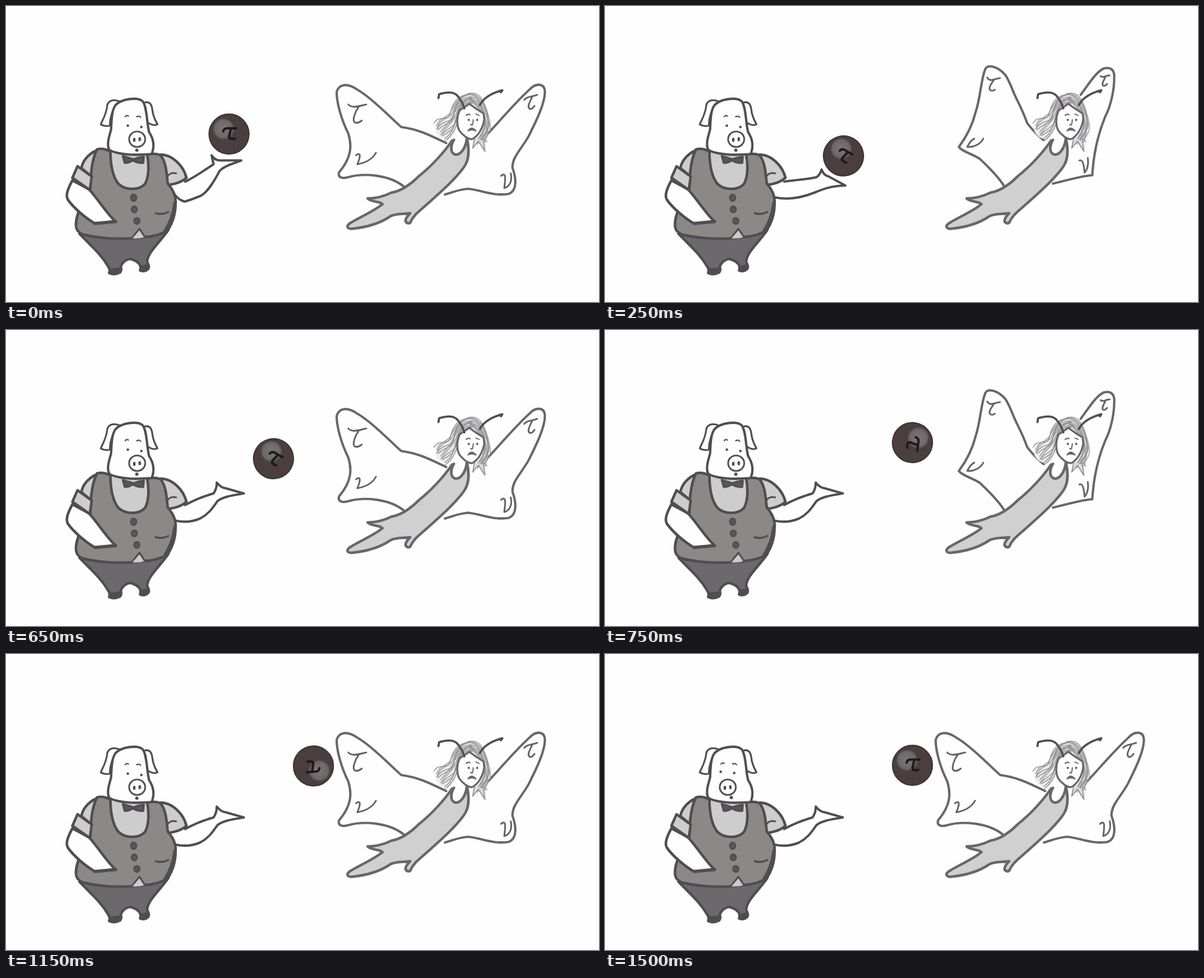
Animation, 920 px wide and 460 px high, one loop 1.75 s. Source, as an HTML page:

```html
<!DOCTYPE html>
<html lang="en">
<head>
<meta charset="utf-8">
<title>Pig and winged woman</title>
<style>
  html, body { margin: 0; width: 100%; height: 100%; overflow: hidden; background: #fefefe; }
  svg { display: block; width: 920px; height: 460px; }
  path, ellipse, circle { stroke-linecap: round; stroke-linejoin: round; }
  .pig { fill: none; stroke: #4f4d50; stroke-width: 4; }
  .fairy { fill: none; stroke: #68666a; stroke-width: 4; }
  .wing { stroke-width: 3.6; }
  .wing .mark { stroke: #626064; stroke-width: 2.6; }
  .white { fill: #fefefe; }
  .shirt { fill: #cdcdcd; }
  .vest { fill: #8b8988; }
  .pants { fill: #6b696b; }
  .dark { fill: #59575a; }
  .thin { stroke-width: 2.8; }
  .dot { fill: #4f4d50; stroke: none; }
</style>
</head>
<body>
<svg viewBox="0 0 920 460">
  <defs>
    <radialGradient id="shine">
      <stop offset="0" stop-color="#7b7778"/>
      <stop offset=".8" stop-color="#6c6768"/>
      <stop offset="1" stop-color="#4b3e3f"/>
    </radialGradient>
  </defs>

  <g class="pig">
    <path id="arm" class="white" stroke-width="3.6"/>
    <path class="shirt" d="M240 231C257 231 275 247 280 267C272 274 262 277 251 278Z"/>
    <path class="thin" d="M251 264C255 259 259 259 264 260"/>
    <path class="shirt" d="M148 222C131 226 119 239 117 252L134 266L146 250Z"/>
    <path class="shirt" stroke="none" d="M158 224L228 230L224 282L172 284Z"/>
    <path class="pants" d="M114 354C130 371 147 385 158 404Q162 409 160 415Q168 419 177 414Q180 410 178 405C182 395 191 392 196 394C205 397 211 403 208 411Q215 414 221 408Q223 404 219 398C219 383 240 366 252 348C230 363 160 365 114 354Z"/>
    <path class="dot" d="M159 408L179 406L177 415L161 417ZM208 404L220 401L222 408L209 412Z"/>
    <path class="vest" d="M141 223Q150 220 162 226C162 245 165 264 174 276C185 287 207 287 216 276C222 264 222 246 219 231Q231 228 240 232C249 244 249 260 251 276C261 287 264 299 263 308C263 325 257 340 251 348C243 354 229 358 215 359L207 347L196 361C165 363 136 359 119 355Q110 351 109 344C107 333 112 322 115 313L131 284C131 262 134 237 141 223Z"/>
    <path d="M262 306Q259 330 247 349" stroke-width="5"/>
    <path class="shirt" stroke="none" d="M207 347L195 361Q207 362 216 359Z"/>
    <path stroke-width="2" d="M207 347L195 361M207 347L215 359"/>
    <path class="white" d="M103 271C96 284 92 294 96 301C105 314 124 330 138 338L170 335C157 323 147 306 129 285Z"/>
    <path class="shirt" d="M111 249L133 265L130 286L103 267Z"/>
    <path d="M138 338L170 335" stroke-width="5"/>
    <path d="M232 322Q243 325 252 320" stroke-width="3"/>
    <g class="dark" stroke-width="2.4">
      <ellipse cx="198" cy="298" rx="4.4" ry="5.2"/>
      <ellipse cx="199" cy="316" rx="4.4" ry="4.8"/>
      <ellipse cx="203" cy="334" rx="4.4" ry="4.8"/>
    </g>

    <path class="white thin" d="M176 148C165 144 158 148 157 155C156 167 150 177 147 184Q153 188 161 186C161 173 166 160 171 153"/>
    <path class="white thin" d="M215 150C222 148 226 152 227 161C228 172 232 178 235 184Q228 187 220 181"/>
    <path class="white" stroke-width="3.6" d="M160 223C156 214 160 203 163 192C164 175 164 162 170 154C179 144 204 141 212 148C219 157 218 180 222 196C230 208 230 220 226 230Q192 233 172 228Q163 226 160 223Z"/>
    <path class="dark thin" d="M181 233L184 244Q191 244 197 240Q205 245 213 244L214 234Q205 235 198 238Q189 235 181 233Z"/>
    <path id="brows" stroke-width="2" d="M185 172Q187 169 190 171M203 172Q207 170 209 173"/>
    <g id="eyes" class="dot"><circle cx="189" cy="186" r="2"/><circle cx="210" cy="188" r="2"/></g>
    <g id="snout">
      <ellipse cx="203.5" cy="207" rx="12.5" ry="12" stroke-width="2.6"/>
      <ellipse class="dot" cx="199" cy="208" rx="2" ry="3.2"/>
      <ellipse class="dot" cx="207.5" cy="207" rx="2" ry="3.2"/>
    </g>
    <circle id="mouth" class="dot" cx="203" cy="224" r="2.6"/>
  </g>

  <g class="fairy wing" id="spread">
    <path d="M683 213C660 202 642 192 613 188C597 174 567 142 545 130C530 119 516 121 513 134C513 150 520 176 531 198C537 217 536 236 517 258C514 266 521 269 531 266C555 259 596 262 619 282"/>
    <path d="M746 200C765 180 790 150 812 130C822 119 835 120 836 132C837 150 822 180 811 202C800 222 784 236 786 252C791 266 794 287 780 292C755 296 737 286 717 284C702 285 692 290 681 293"/>
    <path class="mark" d="M531 153C537 160 549 155 559 153M547 157C541 165 537 178 541 181Q546 183 552 178M543 232C551 226 550 235 545 246C556 244 568 239 574 228"/>
    <path class="mark" d="M804 146C808 140 815 142 824 138M816 142C812 150 808 158 813 160Q816 161 820 155M768 264C776 257 775 268 773 283C781 281 786 272 783 260"/>
  </g>
  <g class="fairy wing" id="raised">
    <path d="M680 208C668 198 661 190 655 182C648 162 641 150 636 139C630 125 625 111 620 106C609 94 594 90 590 98C583 115 583 141 575 165C569 189 558 207 549 219C553 226 571 230 582 238C597 252 612 268 620 281"/>
    <path d="M738 138C750 122 762 102 774 97C785 94 791 100 790 112C790 130 785 155 776 172C767 194 758 226 756 263C740 264 715 271 695 276"/>
    <path class="mark" d="M593 111C597 119 605 113 613 112M604 114C599 121 594 128 598 131Q601 133 605 130M573 206Q567 209 562 219C573 220 583 214 587 206"/>
    <path class="mark" d="M769 109C773 113 778 107 783 108M776 111C773 117 770 122 773 124Q776 125 779 121M736 240C741 238 743 246 744 259C750 252 750 243 749 236"/>
  </g>

  <g class="fairy">
    <path class="white" stroke="none" d="M696 204L717 202L716 228L696 236L688 222Z"/>
    <path fill="#d0d0d0" d="M692 209C681 226 660 249 641 264C626 279 611 288 598 290C586 296 572 299 561 299C566 305 580 303 584 308C571 319 545 330 533 338C527 343 530 347 538 346C557 344 580 338 596 327C605 322 615 324 627 322Q619 330 620 335Q623 339 627 337C632 325 641 319 651 310C670 293 700 267 712 248C720 235 718 219 715 205C714 218 707 231 698 231C688 229 690 216 695 208"/>
    <path fill="#ededed" stroke="none" d="M720 136C700 138 690 152 689 167C677 170 668 178 666 194C672 206 680 207 688 207C699 196 700 184 703 167L725 152L742 175L734 200L744 226L749 185C750 160 741 138 720 136Z"/>
    <g id="hair" stroke="#949294" stroke-width="1.3"></g>
    <path stroke="#949294" stroke-width="1.6" fill="#dedede" d="M727 206L724 221L733 210L743 226L740 206L746 211"/>
    <path class="white" stroke-width="3" d="M704 162C699 172 699 185 703 193C708 201 717 207 723 207C732 203 740 190 742 176L741 167Q729 160 719 152Q710 158 704 162Z"/>
    <path stroke-width="1.8" d="M714 170Q717 167 720 169M729 168L734 170M725 177L724 184Q722 186 721 184"/>
    <g class="dot"><circle cx="718" cy="177" r="1.7"/><circle cx="731" cy="177" r="1.7"/></g>
    <path class="dark" stroke-width="2" d="M717 194Q722 186 729 194Q722 191 717 194Z"/>
    <path stroke="#504e51" stroke-width="3.4" d="M671 143L672 137C685 133 695 134 700 139C706 146 709 151 711 159M735 154C741 143 754 135 770 131L768 134"/>
  </g>

  <g id="ball">
    <circle r="31" fill="#4b3e3f" stroke="#3a3334" stroke-width="1.8"/>
    <circle cx="-8.5" cy="-8" r="17" fill="url(#shine)"/>
    <path fill="none" stroke="#1d191a" stroke-width="3.6" d="M-9 -4Q-8 -9 -3 -9L11 -9M3 -9L0 4Q1 9 9 7"/>
  </g>
</svg>
<script>
  const el = id => document.getElementById(id);

  // Hair: strands blended between an outer and an inner curve.
  function addStrands(outer, inner, count) {
    for (let i = 0; i < count; i++) {
      const k = i / (count - 1);
      const p = outer.map((v, j) => v + (inner[j] - v) * k + Math.sin(i * 4.7 + j) * 1.6);
      const strand = document.createElementNS('http://www.w3.org/2000/svg', 'path');
      strand.setAttribute('d', `M${p.slice(0, 2)}C${p.slice(2, 8)}S${p.slice(8)}`);
      el('hair').append(strand);
    }
  }
  addStrands([718, 136, 700, 138, 694, 152, 690, 165, 670, 167, 665, 184],
             [728, 150, 714, 153, 705, 161, 702, 174, 699, 197, 681, 208], 11);
  addStrands([717, 135, 734, 131, 744, 151, 749, 170, 750, 194, 743, 211],
             [719, 149, 730, 153, 738, 163, 741, 177, 739, 194, 729, 214], 8);

  const arms = {
    high: 'M278 273C297 264 312 252 322 246L319 232Q324 240 332 240Q350 240 365 240C350 246 337 249 331 257C322 274 313 289 302 295Q285 302 277 304Q267 301 260 291',
    low: 'M278 273C295 270 312 270 328 266Q334 262 336 254Q339 263 347 265Q362 273 373 279C352 279 337 285 325 290C305 298 283 302 262 297',
    open: 'M278 272C294 263 308 258 322 254Q327 247 327 237Q333 245 341 246Q355 250 369 254C351 257 337 259 328 266C319 279 313 287 301 293Q283 301 262 296'
  };
  // [arm, ball x, ball y, ball turn]
  const poses = [
    ['high', 346, 199, 0],
    ['low', 370, 233, 30],
    ['open', 415, 200, 30],
    ['open', 477, 175, 98],
    ['open', 477, 174, 176],
    ['open', 477, 173.5, 268],
    ['open', 477, 173, 360]
  ];

  const shift = (id, x, y) => el(id).setAttribute('transform', `translate(${x} ${y})`);

  function draw() {
    const step = Math.floor(performance.now() % 1750 / 250);
    const [arm, x, y, turn] = poses[step];
    const look = step > 4 ? 1 : 0;
    el('arm').setAttribute('d', arms[arm]);
    el('ball').setAttribute('transform', `translate(${x} ${y}) rotate(${turn})`);
    el('spread').style.display = step % 2 ? 'none' : '';
    el('raised').style.display = step % 2 ? '' : 'none';
    shift('brows', -5 * look, -look);
    shift('eyes', -9.5 * look, -3 * look);
    shift('snout', -13 * look, 0);
    shift('mouth', -7 * look, -look);
    requestAnimationFrame(draw);
  }
  draw();
</script>
</body>
</html>
```
